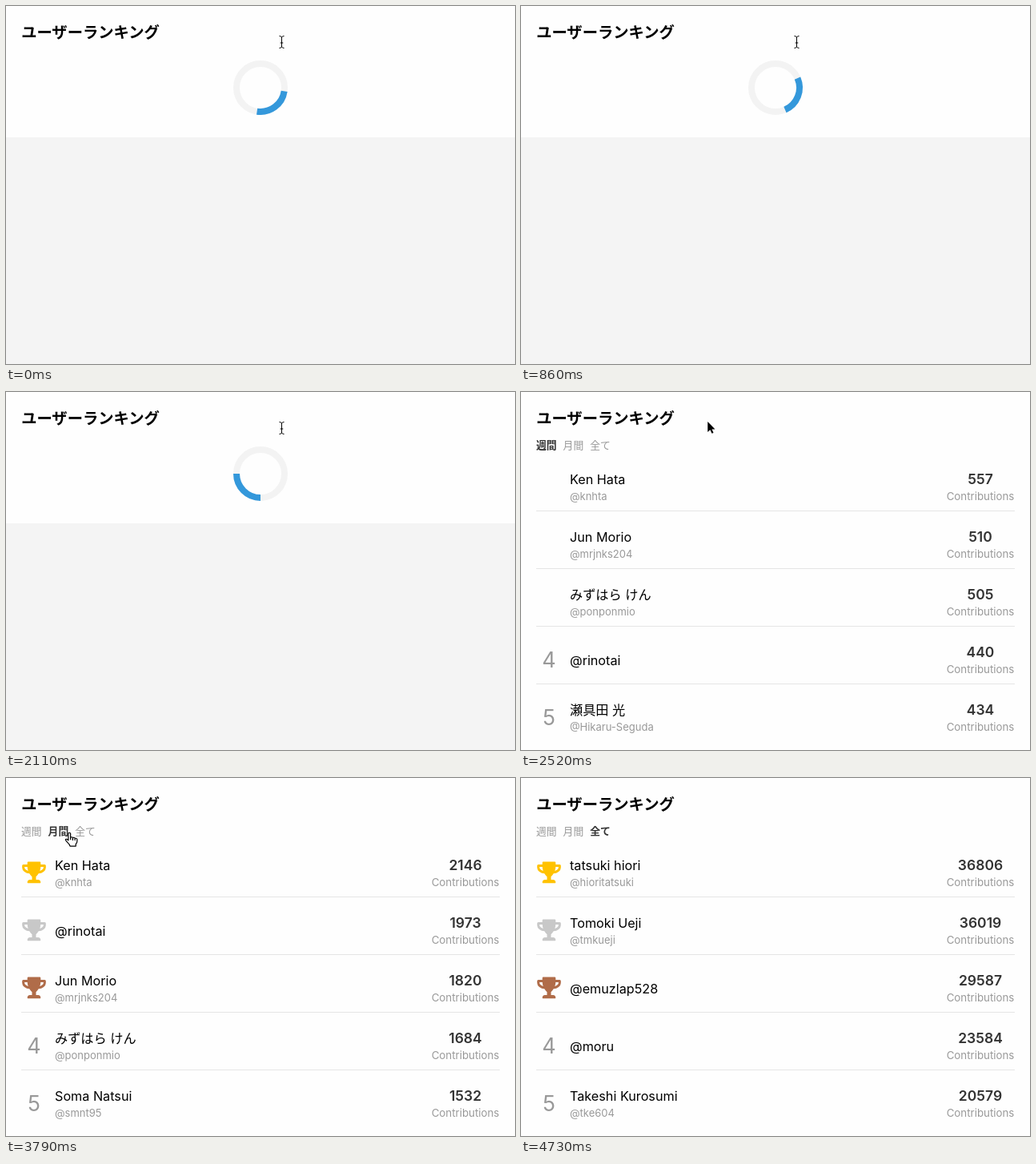
Animation, 636 px wide and 447 px high, one loop 5650 ms. Source, as an HTML page:

```html
<!DOCTYPE html>
<html lang="ja">
<head>
<meta charset="utf-8">
<title>ユーザーランキング</title>
<style>
  html, body { margin: 0; width: 100%; height: 100%; overflow: hidden; background: #fefefe; }
  svg { display: block; width: 636px; height: 447px; }
  text { font-family: Inter, "Noto Sans CJK JP", "Noto Sans CJK", sans-serif; }
  .title { font-size: 19.3px; font-weight: 700; }
  .tab { font-size: 12.8px; fill: #999; }
  .tab.on { fill: #333; font-weight: 700; }
  .name { font-size: 16.2px; }
  .handle { font-size: 13px; fill: #999; }
  .unit { font-size: 13.3px; fill: #999; text-anchor: middle; }
  .count { font-size: 17.5px; font-weight: 600; fill: #333; text-anchor: middle; }
  .rank { font-size: 27px; fill: #999; text-anchor: middle; }
</style>
</head>
<body>
<svg id="stage" viewBox="0 0 636 447">
  <defs>
    <g id="trophy">
      <path d="M6.7 1.2Q6.7 0 7.9 0H22.1Q23.3 0 23.3 1.2V6C23.3 14 17.5 18.7 17.5 18.7V22.5H20Q23.3 22.5 23.3 26Q23.3 26.7 22.7 26.7H7.3Q6.7 26.7 6.7 26Q6.7 22.5 10 22.5H12.5V18.7C12.5 18.7 6.7 14 6.7 6Z"/>
      <path d="M7 5H1.67V7.5C1.67 10 5 13 9.5 13.3M23 5H28.33V7.5C28.33 10 25 13 20.5 13.3" fill="none" stroke="currentColor" stroke-width="3" stroke-linejoin="round"/>
    </g>
  </defs>
  <rect width="636" height="447" fill="#fefefe"/>
  <text class="title" x="19.2" y="40">ユーザーランキング</text>
  <g id="loading">
    <rect y="164" width="636" height="283" fill="#f4f4f4"/>
    <circle cx="318" cy="102" r="30" fill="none" stroke="#f3f3f3" stroke-width="8"/>
    <path id="arc" d="M348 102A30 30 0 0 1 318 132" fill="none" stroke="#3498db" stroke-width="8"/>
  </g>
  <g id="board">
    <g id="tabs"></g>
    <g id="frame"></g>
    <g id="trophies"></g>
    <g id="lists"></g>
  </g>
  <g id="cursor">
    <path data-kind="beam" d="M-3 .5Q-.5 .5 0 2Q.5 .5 3 .5M0 2V14M-3 15.5Q-.5 15.5 0 14Q.5 15.5 3 15.5M-1.8 9H1.8" fill="none" stroke="#000"/>
    <path data-kind="arrow" d="M0 0V15L3.5 11.8L6 17L8.3 16L6 11H10.5Z" transform="scale(.88)" stroke="#fff" stroke-width="1.2" paint-order="stroke"/>
    <path data-kind="hand" d="M4 10V2Q4 .6 5.2 .6T6.5 2V7Q6.5 6 7.8 6T9 7.3Q9.2 6.4 10.3 6.5T11.5 8Q11.7 7.3 12.8 7.5T14 9V11Q14 13 12.5 14.5V17H6Q5.5 15 3 12.5Q1 10.5 .8 9Q1.5 7.5 4 10ZM6.5 7V9.5M9 7.3V10M11.5 8V10" transform="translate(-.7 0) scale(1.1 1.03)" fill="#fff" stroke="#000" stroke-width="1.1" stroke-linejoin="round"/>
  </g>
</svg>
<script>
const LOOP = 5650, TICK = 57.1, ROW = 72;
const LOADED = 2350, ICONS = 2635, MONTH = 3560, ALL = 4200, GONE = 4730;

const boards = [
  [["Ken Hata", "@knhta", 557], ["Jun Morio", "@mrjnks204", 510], ["みずはら けん", "@ponponmio", 505],
   ["@rinotai", "", 440], ["瀬具田 光", "@Hikaru-Seguda", 434]],
  [["Ken Hata", "@knhta", 2146], ["@rinotai", "", 1973], ["Jun Morio", "@mrjnks204", 1820],
   ["みずはら けん", "@ponponmio", 1684], ["Soma Natsui", "@smnt95", 1532]],
  [["tatsuki hiori", "@hioritatsuki", 36806], ["Tomoki Ueji", "@tmkueji", 36019], ["@emuzlap528", "", 29587],
   ["@moru", "", 23584], ["Takeshi Kurosumi", "@tke604", 20579]]
];

// [time, x, y]
const route = [
  [2290, 344.5, 37], [2520, 234, 37], [2700, 130, 20], [2865, 66, 27], [3040, 45, 50],
  [3150, 43.5, 60], [3310, 55, 63], [3560, 55, 63], [3940, 88.5, 71], [4430, 88.5, 71],
  [4485, 110, 82], [4542, 230, 142], [4600, 420, 238], [4656, 603, 330]
];
// [tick, degrees]
const spin = [[0, 8.4], [15, 336.5], [37, 810], [42, 917.6]];

const $ = id => document.getElementById(id);

function add(parent, tag, attrs, text) {
  const el = document.createElementNS("http://www.w3.org/2000/svg", tag);
  for (const key in attrs) el.setAttribute(key, attrs[key]);
  if (text !== undefined) el.textContent = text;
  return parent.appendChild(el);
}

function label(parent, cls, x, y, text) {
  return add(parent, "text", { class: cls, x, y }, text);
}

function show(el, on) {
  el.style.display = on ? "" : "none";
}

function sample(keys, t) {
  if (t <= keys[0][0]) return keys[0].slice(1);
  for (let i = 1; i < keys.length; i++) {
    const [t0, ...a] = keys[i - 1], [t1, ...b] = keys[i];
    if (t <= t1) return a.map((v, j) => v + (b[j] - v) * (t - t0) / (t1 - t0));
  }
  return keys[keys.length - 1].slice(1);
}

const tabs = ["週間", "月間", "全て"].map((s, i) => label($("tabs"), "tab", 19 + 33.6 * i, 71.4, s));

for (let i = 0; i < 5; i++) {
  const y = i * ROW;
  label($("frame"), "unit", 574, 135 + y, "Contributions");
  if (i < 4) add($("frame"), "rect", { x: 19, y: 148 + y, width: 598, height: 1, fill: "#e5e5e5" });
  if (i > 2) label($("frame"), "rank", 35, 128.3 + y, i + 1);
}

["#ffc200", "#c8c8c8", "#b06c49"].forEach((color, i) =>
  add($("trophies"), "use", { href: "#trophy", x: 20, y: 104.5 + i * ROW, fill: color, color }));

const lists = boards.map(rows => {
  const group = add($("lists"), "g");
  rows.forEach(([name, handle, count], i) => {
    const y = i * ROW;
    label(group, "name", 61, (handle ? 115 : 125) + y, name);
    if (handle) label(group, "handle", 61, 135 + y, handle);
    label(group, "count", 574, 115 + y, count);
  });
  return group;
});

const cursors = [...$("cursor").children];

// The screen refreshes in even ticks, realigned at each pause.
function snap(t) {
  const base = t < LOADED ? 0 : t < ALL ? LOADED : ALL;
  return base + Math.floor((t - base + 4) / TICK) * TICK;
}

function draw(t) {
  const now = snap(t), loaded = t >= LOADED;
  show($("loading"), !loaded);
  show($("board"), loaded);
  show($("trophies"), t >= ICONS);
  $("arc").setAttribute("transform", `rotate(${sample(spin, now / TICK)[0]} 318 102)`);

  const active = t < MONTH ? 0 : t < ALL ? 1 : 2;
  tabs.forEach((tab, i) => tab.classList.toggle("on", i === active));
  lists.forEach((list, i) => show(list, i === active));

  const kind = !loaded ? "beam" : now > 3100 && now < 4480 ? "hand" : "arrow";
  cursors.forEach(c => show(c, c.dataset.kind === kind));
  const [x, y] = loaded ? sample(route, now) : route[0].slice(1);
  $("cursor").setAttribute("transform", `translate(${x} ${y})`);
  show($("cursor"), t < GONE);
}

const start = performance.now();
function loop() {
  draw((performance.now() - start) % LOOP);
  requestAnimationFrame(loop);
}
loop();
</script>
</body>
</html>
```
